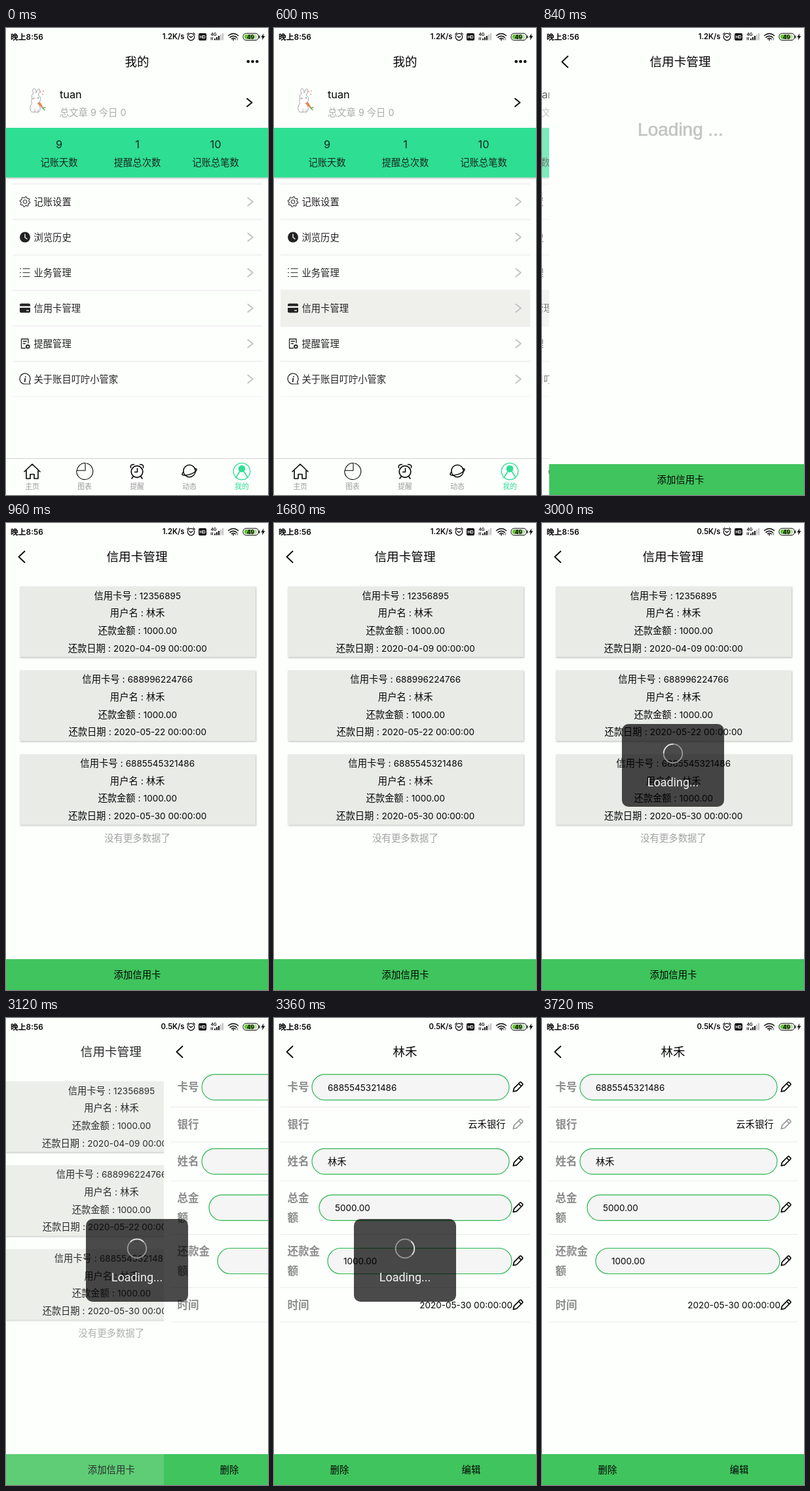
An HTML page for the animation above (3.84 s loop, 400 by 711 pixels).

```html
<!DOCTYPE html>
<html lang="zh-CN">
<head>
<meta charset="utf-8">
<title>信用卡管理</title>
<style>
html, body { margin: 0; width: 100%; height: 100%; overflow: hidden; background: #fdfffd; }
svg { display: block; width: 100vw; height: 100vh; font-family: Inter, "Noto Sans CJK SC", "Noto Sans CJK", sans-serif; }
.num { font-size: 13.5px; }
</style>
</head>
<body>
<svg id="stage" viewBox="0 0 400 711"></svg>
<script>
const LOOP = 3840, STEP = 120, SLIDE = 250;
const BG = '#fdfffd', INK = '#050505', MINT = '#2fde93', LEAF = '#40c45d';

// Drawing helpers
const text = (x, y, s, size = 14.3, fill = INK, anchor = 'start', more = '') =>
  `<text x="${x}" y="${y}" font-size="${size}" fill="${fill}" text-anchor="${anchor}" ${more}>${s}</text>`;
const mid = (x, y, s, size, fill, more) => text(x, y, s, size, fill, 'middle', more);
const num = s => `<tspan class="num">${s}</tspan>`;
const rect = (x, y, w, h, fill, more = '') =>
  `<rect x="${x}" y="${y}" width="${w}" height="${h}" fill="${fill}" ${more}/>`;
const circle = (x, y, r, fill, more = '') =>
  `<circle cx="${x}" cy="${y}" r="${r}" fill="${fill}" ${more}/>`;
const line = (d, color = INK, w = 1.5, fill = 'none') =>
  `<path d="${d}" fill="${fill}" stroke="${color}" stroke-width="${w}" stroke-linecap="round" stroke-linejoin="round"/>`;
const at = (x, y, s, more = '') => `<g transform="translate(${x} ${y}) ${more}">${s}</g>`;
const chevron = (x, y, color, w) => line(`M${x} ${y - 6}l7.5 6-7.5 6`, color, w);
const page = (id, s) => `<g id="${id}">${rect(0, 0, 400, 711, BG)}${s}</g>`;
const back = line('M28.5 43L19.5 51.5L28.5 60', INK, 1.8);

function gear(r, teeth = 8) {
  const pts = [];
  for (let i = 0; i < teeth * 4; i++) {
    const a = (i + 0.5) / (teeth * 4) * Math.PI * 2;
    const d = i % 4 < 2 ? r : r * 0.78;
    pts.push((d * Math.cos(a)).toFixed(2) + ' ' + (d * Math.sin(a)).toFixed(2));
  }
  return line(`M${pts.join('L')}Z`, '#333', 1.1) + circle(0, 0, r * 0.36, 'none', 'stroke="#333" stroke-width="1.1"');
}

function statusBar() {
  const bold = 'font-weight="600"';
  let s = rect(0, 0, 400, 28, BG) + text(7, 18, '晚上8:56', 11.8, INK, 'start', bold) +
    text(272.5, 17.3, '', 11.3, INK, 'end', bold + ' id="speed"');
  s += circle(282.5, 13.6, 5.2, 'none', `stroke="${INK}" stroke-width="1.2"`) +
    line('M280 12.5l2.3 2 2.6-2M276.6 9.6l2.4-2.2M288.4 9.6l-2.4-2.2', INK, 1.2);
  s += rect(294, 8, 12, 11, INK, 'rx="2"') + mid(300, 16.2, 'HD', 6.6, '#fff', 'font-weight="700"');
  s += text(312.5, 11.5, '4G', 6.5, INK, 'start', bold) + line('M313.2 18v-3.5M315.4 14.5V18', INK, 1);
  for (let i = 0; i < 5; i++) s += rect(318 + i * 3, 16 - i * 2, 1.9, 2.5 + i * 2, i < 3 ? INK : '#bbb');
  s += line('M339.5 11.5q7.5-6 15 0M342 14.2q5-4 10 0M344.5 16.5q2.5-2 5 0', INK, 1.5) +
    circle(347, 18, 1.1, INK) + line('M351 18.2v-3M353.6 15.2v3', '#555', 0.9);
  s += rect(362, 8.2, 23.5, 10.4, '#fff', `rx="4.5" stroke="${INK}" stroke-width="1"`) +
    rect(364, 10, 12, 6.8, '#63c62f', 'rx="2.5"') + rect(376, 10, 7, 6.8, '#b5e59b', 'rx="2"') +
    rect(386.3, 11.5, 1.3, 4, INK) + mid(373.5, 16.8, '49', 8.6, INK, 'font-weight="700"');
  return s + `<path d="M393.5 8l-4.2 6.2h2.5l-1 4.6 4.6-6.6h-2.7z" fill="${INK}"/>`;
}

function rabbit() {
  const edge = '#9a9a9a';
  return line('M40 108q-2-7 2-8-3-7 1-8 3 1 3 7 2-7 5-6 2 3-2 9 5 3 3 9-1 4-4 4 5 3 4 10l-2 3h-11q-4-5-1-11l2-3q-3-2 0-6z', edge, 0.9, '#fff') +
    circle(42.5, 107, 0.8, '#333') + circle(49, 106.5, 0.8, '#333') +
    line('M44 128v-5M49 128v-4', edge, 0.8) +
    '<path d="M48 114l4-1 5 8-2 1z" fill="#ee8243"/>' + line('M56 122l4-1M56 122l3 3', '#5fae62', 1.4) +
    [[53, 97], [57, 96], [56, 101]].map(p => circle(...p, 1, '#e9a38e')).join('');
}

function menuIcon(i) {
  const white = '#fff';
  return [
    () => gear(7.8),
    () => circle(0, 0, 8, '#222') + line('M0-4.5V.5l3 2', white, 1.4),
    () => [-6, 0, 6].map(y => line(`M-7.5 ${y}h1M-3 ${y}h10`, '#333', 1.2)).join(''),
    () => rect(-8, -7, 16, 14, '#222', 'rx="2"') + rect(-8, -3, 16, 2.4, white) + rect(2, 3, 4, 1.3, white),
    () => line('M5-1v-6h-10.5v14h6M-2.7-3.5h5M-2.7 0h3', '#222', 1.3) +
      circle(4.3, 4.5, 2.4, 'none', 'stroke="#222" stroke-width="1.8"'),
    () => line('M8 7.5h-8a8 8 0 1 1 6.4-3.2z', '#222', 1.2) +
      mid(0, 4.3, 'i', 13, '#222', 'font-family="Liberation Serif, serif" font-style="italic" font-weight="700"')
  ][i]();
}

function tabIcons() {
  const home = line('M28 675.5L40 664l12 11.5M31 673.5V686h6v-6.5h6v6.5h6v-12.5', INK, 1.6);
  const pie = line('M123 662.8a12.5 12.5 0 1 1-15.2 11h13.2V662.3a12.5 12.5 0 0 0-12.5 11.5', INK, 1.1);
  const clock = circle(200, 675.5, 8.8, 'none', `stroke="${INK}" stroke-width="1.7"`) +
    line('M190.5 669.5q-1.5-5 5-5M209.5 669.5q1.5-5-5-5M194 683l-2 3M206 683l2 3M200.5 670.5v5.5h-4', INK, 1.6);
  const planet = circle(280, 674.5, 9.2, 'none', `stroke="${INK}" stroke-width="1.5"`) +
    line('M271 676q-5 5 2 5 10-.5 17-6.500 3-4-2-3.500', INK, 1.5);
  const me = circle(360, 675, 12.7, 'none', `stroke="${MINT}" stroke-width="1.3"`) +
    circle(360, 671, 5.3, MINT) + line('M357 675l-6 9.500M363 675l6 9.500', MINT, 1.6);
  return home + pie + clock + planet + me;
}

function profilePage() {
  let s = mid(200, 58, '我的', 18.5) + [369.7, 376.5, 383.3].map(x => circle(x, 51, 2.3, INK)).join('');
  s += rabbit() + text(82, 107, 'tuan', 16.3) + text(82, 133.5, '总文章 9 今日 0', 14.3, '#a9aaa9') +
    chevron(368, 113.5, INK, 1.9);
  s += rect(0, 152, 400, 75.5, MINT, 'filter="url(#soft)"');
  [['9', '记账天数', 81], ['1', '提醒总次数', 200.5], ['10', '记账总笔数', 320]].forEach(([n, label, x]) => {
    s += mid(x, 183, n, 16.3, '#16291f') + mid(x, 210, label, 14.3, '#16291f');
  });
  s += rect(10, 236.5, 381, 2, '#eff0ef');
  const items = ['记账设置', '浏览历史', '业务管理', '信用卡管理', '提醒管理', '关于账目叮咛小管家'];
  items.forEach((label, i) => {
    const y = 264.5 + i * 54;
    s += rect(10, y + 26, 381, i < 5 ? 2 : 1, '#eff0ef');
    if (i === 3) s += rect(10, 399, 381, 56, '#efefec', 'id="press"');
    s += at(29, y, menuIcon(i)) + text(42.5, y + 5.3, label, 14.3, '#222') + chevron(369.3, y, '#bfc0bf', 1.7);
  });
  s += rect(0, 655, 400, 1, '#cfd0cf') + tabIcons();
  ['主页', '图表', '提醒', '动态', '我的'].forEach((label, i) => {
    s += mid(40 + i * 80, 702.3, label, 10.8, i < 4 ? '#999' : MINT);
  });
  return s;
}

const button = rect(0, 664, 400, 47, LEAF);

function cardsPage() {
  const cards = [['12356895', '04-09'], ['688996224766', '05-22'], ['6885545321486', '05-30']];
  let s = '';
  cards.forEach(([no, day], i) => {
    const y = 96.5 + i * 127.7;
    const rows = [['信用卡号', num(no)], ['用户名', '林禾'], ['还款金额', num('1000.00')],
      ['还款日期', num(`2020-${day} 00:00:00`)]];
    s += rect(21, y, 360, 107.3, '#e9ebe7', 'filter="url(#soft)"');
    rows.forEach((row, k) => { s += mid(200.7, y + 19.2 + k * 26.6, row.join(' : ')); });
  });
  s += mid(200.5, 485, '没有更多数据了', 14.4, '#a0a1a0');
  return back + mid(200, 58, '信用卡管理', 18.6) + `<g id="cards">${s}</g>` +
    mid(200.5, 163.5, 'Loading ...', 28, '#c3c4c3',
      'id="wait" font-family="Liberation Sans, Arial, sans-serif" stroke="#c3c4c3" stroke-width="0.7"') +
    button + mid(200.5, 693, '添加信用卡', 14.4);
}

function detailPage() {
  const label = (y, s) => text(20.5, y + 6, s, 16.5, '#8b8c8b', 'start', 'font-weight="700"');
  const field = (x, right, y) =>
    rect(x, y - 19.5, right - x, 39, '#f4f5f4', 'rx="19.5" stroke="#2cb650" stroke-width="1.2"');
  const pencil = (y, color = INK) => at(372, y, line(
    'M-2.8 5V-7.5q0-1.5 1.5-1.5h2.6q1.5 0 1.5 1.5V5L0 9.5zM-2.8-5H2.8', color, 1.7), 'rotate(45)');
  let s = back;
  [135.5, 188.5, 248, 329.5, 410.5, 463].forEach(y => { s += rect(10, y - 0.5, 381, 1, '#e9ebe9'); });
  [[105, '卡号'], [161.5, '银行'], [218, '姓名'], [273.5, '总金'], [304, '额'], [355, '还款金'], [385, '额'], [437, '时间']]
    .forEach(([y, t]) => { s += label(y, t); });
  const fields = [[58, 359, 105.3, num('6885545321486')], [58, 359, 218.3, '林禾'],
    [69, 363, 288.8, num('5000.00')], [82, 363, 370, num('1000.00')]];
  let data = mid(200, 58, '林禾', 18.5) + text(353.5, 167, '云禾银行', 14.3, INK, 'end') +
    text(364, 442.3, num('2020-05-30 00:00:00'), 14.3, INK, 'end');
  fields.forEach(([x, right, y, value]) => {
    s += field(x, right, y) + pencil(y);
    data += text(x + 24, y + 5.4, value);
  });
  return s + pencil(162, '#999') + pencil(437) + `<g id="data">${data}</g>` + button +
    mid(100, 693, '删除', 14.4) + mid(301, 693, '编辑', 14.4);
}

const toast = `<g id="toast">${rect(122, 306, 156, 126, '#000', 'rx="10" opacity="0.71"')}
  ${circle(200, 351, 14.3, 'none', 'stroke="#999" stroke-width="1.8"')}
  <path id="spin" d="M200 336.7a14.3 14.3 0 0 1 14.3 14.3" fill="none" stroke="#ddd" stroke-width="1.8"/>
  ${mid(200, 401, 'Loading...', 18, '#f2f2f2', 'font-family="Roboto, sans-serif"')}</g>`;

document.getElementById('stage').innerHTML =
  `<defs><filter id="soft" x="-5%" y="-10%" width="110%" height="125%">
    <feDropShadow dx="0.8" dy="1.4" stdDeviation="1.2" flood-color="#000" flood-opacity="0.28"/></filter></defs>` +
  page('profile', profilePage()) + page('list', cardsPage()) + page('detail', detailPage()) + toast + statusBar();

const $ = Object.fromEntries([...document.querySelectorAll('#stage [id]')].map(el => [el.id, el]));
const show = (el, on) => el.setAttribute('display', on ? 'inline' : 'none');

// Accelerate, then decelerate
function progress(t, start) {
  const p = Math.min(1, Math.max(0, (t - start) / SLIDE));
  return (1 - Math.cos(Math.PI * p)) / 2;
}

// The page below drifts a quarter of the way and fades
function cover(below, above, p) {
  below.setAttribute('transform', `translate(${-100 * p} 0)`);
  below.setAttribute('opacity', 1 - 0.4 * p);
  above.setAttribute('transform', `translate(${Math.round(400 * (1 - p))} 0)`);
  show(below, p < 1);
  show(above, p > 0);
}

function draw(t) {
  const first = progress(t, 616.5), second = progress(t, 3011.5);
  cover($.profile, $.list, first);
  if (first === 1) cover($.list, $.detail, second);
  else { $.list.setAttribute('opacity', 1); show($.detail, false); }
  show($.press, t >= 360);
  show($.wait, t < 960);
  show($.cards, t >= 960);
  show($.data, t >= 3360);
  show($.toast, t >= 3000 && t < 3480);
  $.spin.setAttribute('transform', `rotate(${(t - 3120) * 0.36 - 45} 200 351)`);
  $.speed.textContent = t < 2640 ? '1.2K/s' : '0.5K/s';
}

const start = performance.now();
function tick() {
  const t = (performance.now() - start + 1) % LOOP;
  draw(Math.floor(t / STEP) * STEP);
  requestAnimationFrame(tick);
}
tick();
</script>
</body>
</html>
```
